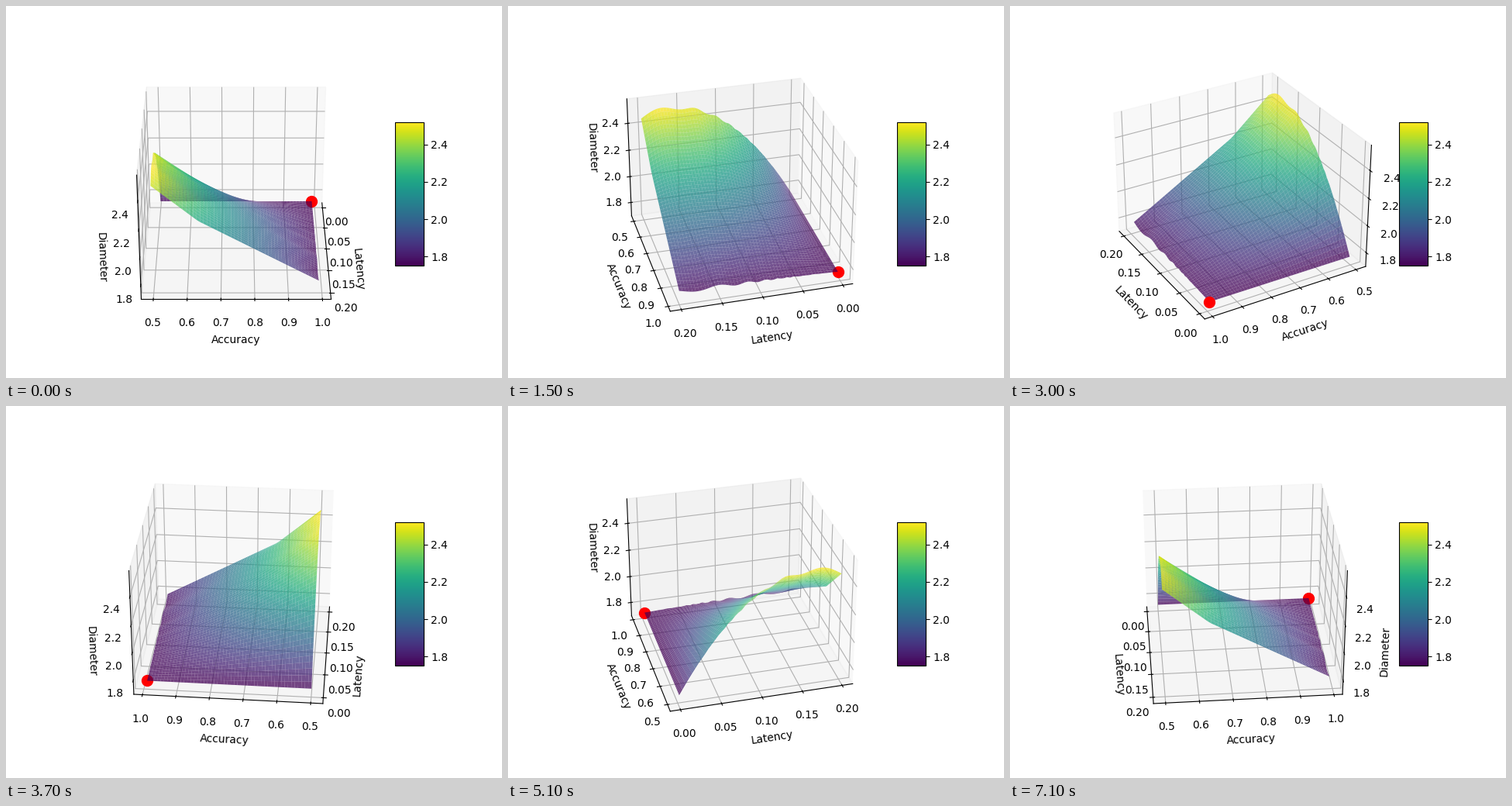
These frames come from a looping animation (640 by 480 pixels, 7200 ms). A matplotlib script:

```python
import numpy as np
import matplotlib.pyplot as plt
from matplotlib.animation import FuncAnimation

FRAMES = 72
Z_LOW, Z_HIGH = 1.752, 2.523
LAT_LOW, LAT_HIGH = 0.002, 0.199
ACC_LOW, ACC_HIGH = 0.5, 0.99


def falloff(latency, accuracy):
    """Share of the full height left at an accuracy; creased at high latency."""
    t = (1 - accuracy) / 0.5
    smooth = 0.01 + 0.76 * t + 0.23 * t ** 2
    creased = np.interp(accuracy, [ACC_LOW, 0.635, ACC_HIGH], [1, 0.65, 0.035])
    mix = (latency / 0.2) ** 4
    return (1 - mix) * smooth + mix * creased


def ripple(latency, accuracy):
    """Waves evenly spaced in 1/latency, opposite at the two accuracy ends."""
    wave = np.cos(2 * np.pi * (1 / latency - 6.7) / 2.05)
    size = 0.014 * (latency / 0.16) ** 1.5
    return size * wave * (accuracy - 0.76) / 0.25


def diameter(latency, accuracy):
    run = latency - LAT_LOW
    rise = 9.8 * run - 30.7 * run ** 2
    z = rise * falloff(latency, accuracy) + ripple(latency, accuracy)
    z = np.maximum(z, 0)
    return Z_LOW + (Z_HIGH - Z_LOW) * z / z.max()


fig = plt.figure(figsize=(6.4, 4.8), dpi=100)
ax = fig.add_subplot(projection="3d")

lat, acc = np.meshgrid(np.linspace(LAT_LOW, LAT_HIGH, 50),
                       np.linspace(ACC_LOW, ACC_HIGH, 50))
surface = ax.plot_surface(lat, acc, diameter(lat, acc), cmap="viridis",
                          alpha=0.75, linewidth=0, antialiased=True)
surface.set_clim(Z_LOW, 2.519)
ax.scatter([LAT_LOW], [ACC_HIGH], [Z_LOW], color="red", s=100)

ax.set_xlabel("Latency")
ax.set_ylabel("Accuracy")
ax.set_zlabel("Diameter")
ax.set_xticks(np.arange(5) * 0.05)
ax.set_yticks(np.arange(5, 11) / 10)
z_ticks = [1.8, 2.0, 2.2, 2.4]
ax.set_zticks(z_ticks)

bar = fig.colorbar(surface, shrink=0.5, aspect=5, ticks=z_ticks)
bar.solids.set_alpha(1)


def turn(i):
    ax.view_init(elev=30, azim=i * 360 / FRAMES)
    return []


anim = FuncAnimation(fig, turn, frames=FRAMES, interval=100, repeat=True,
                     repeat_delay=0, blit=False)
plt.show()
```
